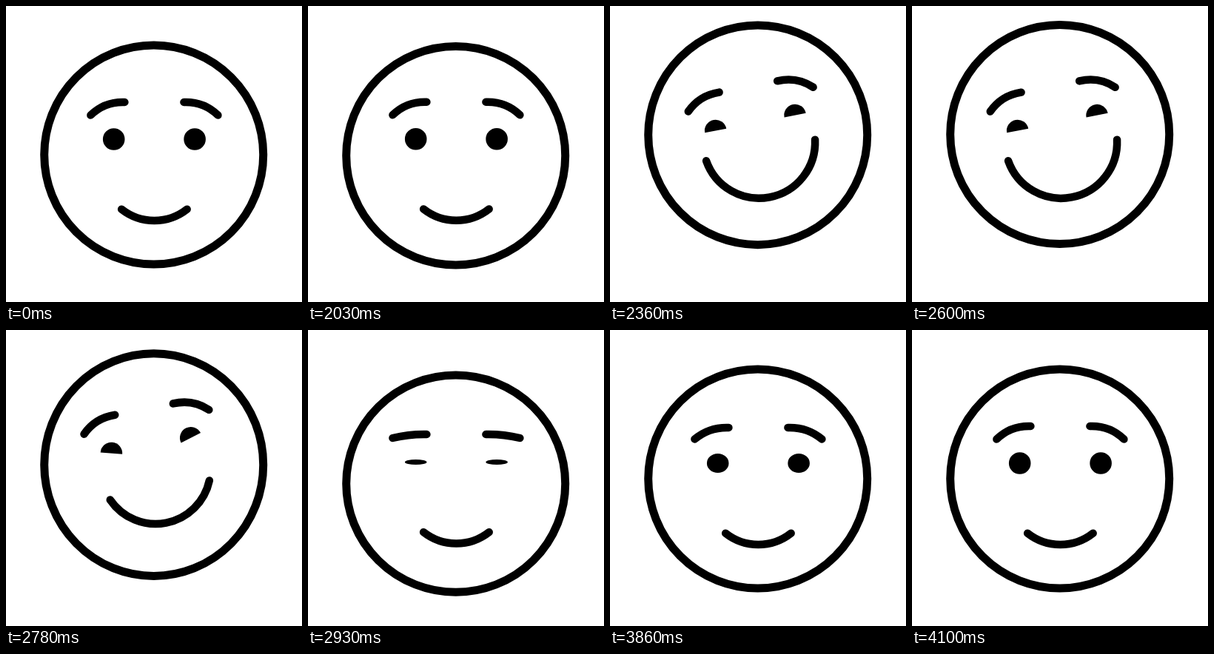
Recreate the animation shown at these times as an HTML page. Size 400 px wide and 400 px high, loop 5180 ms.

```html
<!DOCTYPE html>
<html lang="en">
<head>
<meta charset="utf-8">
<title>Smiling face</title>
<style>
  html, body { margin: 0; width: 100%; height: 100%; overflow: hidden; background: #fff; }
  svg { display: block; width: 100%; height: 100%; }
  .line { fill: none; stroke: #000; stroke-width: 10.5; stroke-linecap: round; }
</style>
</head>
<body>
<svg viewBox="0 0 400 400">
  <ellipse id="face" class="line" cx="199.7" rx="148" style="stroke-width:11"/>
  <!-- features are drawn relative to the centre of the face -->
  <g id="features">
    <g id="upper">
      <path class="line brow"/>
      <path class="line brow" transform="scale(-1 1)"/>
      <path class="eye"/>
      <path class="eye"/>
    </g>
    <path id="mouth" class="line"/>
  </g>
</svg>
<script>
const LOOP = 5180, STEP = 30, EYE = 14.8;
const CROUCH = 2000, JUMP = 2115, TOP = 2385, FALL = 2700, LAND = 2945, REBOUND = 3120, REST = 3230;

const face = document.getElementById('face');
const features = document.getElementById('features');
const upper = document.getElementById('upper');
const mouth = document.getElementById('mouth');
const brows = document.querySelectorAll('.brow');
const eyes = document.querySelectorAll('.eye');

const mix = (a, b, p) => a + (b - a) * p;

function ramp(t, from, to) {
  const p = Math.min(1, Math.max(0, (t - from) / (to - from)));
  return p * p * (3 - 2 * p);
}

// Rises from 0 to 1 between a and b, falls back between c and d.
const pulse = (t, a, b, c, d) => ramp(t, a, b) - ramp(t, c, d);

// Peaks at 1 halfway through a change from 0 to 1.
const midway = p => 4 * p * (1 - p);

const blinkAt = (t, mid) => pulse(t, mid - 135, mid - 15, mid + 15, mid + 135);

function mouthPath(smile) {
  const angle = mix(38.2, 81.6, smile) * Math.PI / 180;
  const r = mix(71.6, 75.7, smile);
  const x = r * Math.sin(angle);
  const y = mix(17.4, 5.5, smile) + r * Math.cos(angle);
  return `M${-x} ${y}A${r} ${r} 0 0 0 ${x} ${y}`;
}

function browPath(blink) {
  const bendX = mix(-67, -63, blink), bendY = mix(-72, -59, blink);
  return `M-86 -53.5Q${bendX} ${bendY} -40 ${mix(-71, -58.5, blink)}`;
}

function eyePath(blink, laugh) {
  const above = mix(EYE, 3.6, blink);
  const below = mix(EYE * (1 - laugh), 3.6, blink);
  return `M${-EYE} 0A${EYE} ${above} 0 0 1 ${EYE} 0A${EYE} ${below} 0 0 1 ${-EYE} 0Z`;
}

function draw(t) {
  const dip = pulse(t, CROUCH, JUMP, JUMP, TOP) + pulse(t, FALL, LAND, LAND, REBOUND);
  const hop = pulse(t, JUMP, TOP, FALL, LAND);
  const rebound = pulse(t, LAND, REBOUND, REBOUND, REST);
  const laugh = pulse(t, 2130, 2345, 2780, 2930);
  const smile = pulse(t, 2050, 2355, 2680, 2935);
  const squint = midway(pulse(t, 2150, 2345, 2680, 2925));
  const blink = blinkAt(t, 2165) + blinkAt(t, 2945) + blinkAt(t, 3965);

  face.setAttribute('cy', 201 + 7 * dip - 27.5 * hop - 3 * rebound);
  face.setAttribute('ry', 148 - 1.5 * dip + 3.7 * midway(hop));

  const y = 201 - 22.3 * laugh - 1.5 * dip;
  features.setAttribute('transform', `translate(200.4 ${y}) rotate(${-11 * laugh})`);
  upper.setAttribute('transform', `translate(0 ${-1.7 * squint})`);
  mouth.setAttribute('d', mouthPath(smile));
  brows.forEach(brow => brow.setAttribute('d', browPath(blink)));
  eyes.forEach((eye, i) => {
    const side = i ? 1 : -1;
    eye.setAttribute('d', eyePath(blink, laugh));
    eye.setAttribute('transform', `translate(${side * 54.7} -21) rotate(${-side * 17 * squint})`);
  });
}

function tick() {
  const t = performance.now() % LOOP;
  draw(Math.floor((t + 10) / STEP) * STEP - 10);
  requestAnimationFrame(tick);
}
tick();
</script>
</body>
</html>
```
